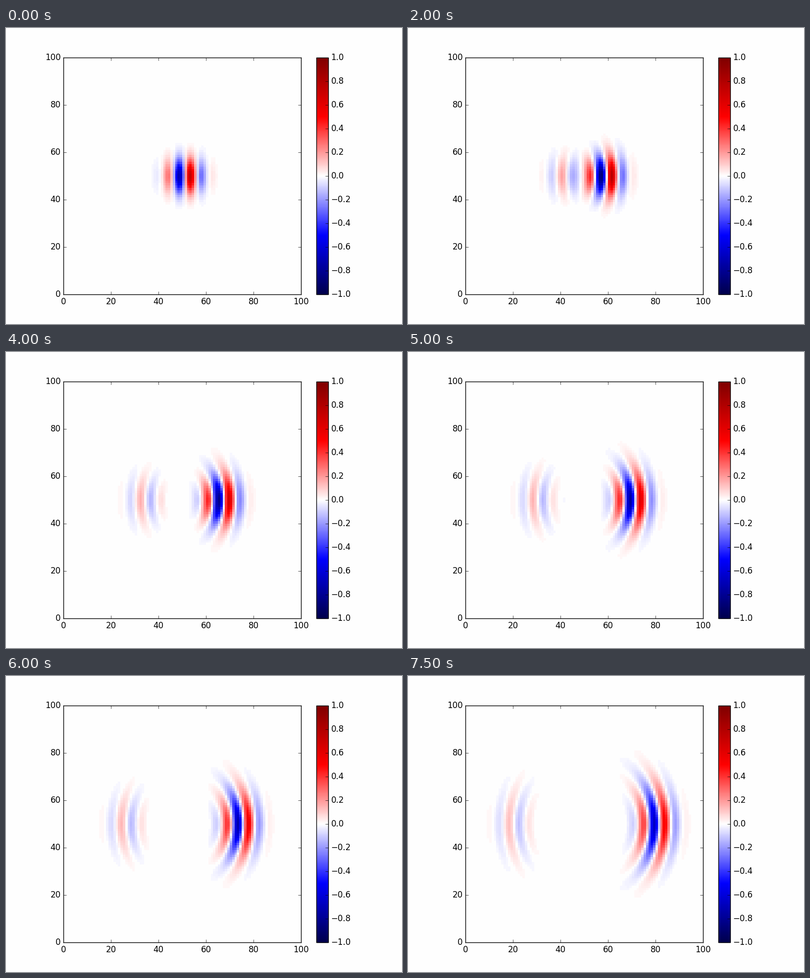
Animation, 800 px wide and 600 px high, one loop 8000 ms. Source, as a matplotlib script:

```python
import numpy as np
import matplotlib.pyplot as plt
from matplotlib.animation import FuncAnimation

FRAMES, INTERVAL = 16, 500
SIZE = 100          # visible cells per side
PAD = 78            # hidden margin, so nothing wraps around
SPEED = 1.99        # cells per frame
FLOOR = 0.012       # weaker values are left blank
PAPER = "#fefefe"

plt.rcParams.update({
    "font.family": "DejaVu Sans",
    "font.size": 12,
    "text.hinting": "auto",
    "axes.linewidth": 1.0,
    "axes.axisbelow": False,
    "ytick.alignment": "center",
})
for axis in "xtick", "ytick":
    plt.rcParams.update({
        f"{axis}.direction": "in",
        f"{axis}.labelsize": 12,
        f"{axis}.major.size": 4,
        f"{axis}.major.width": 0.5,
        f"{axis}.major.pad": 4,
    })

cells = np.arange(-PAD, SIZE + PAD) + 0.5
X, Y = np.meshgrid(cells, cells)
wave_numbers = 2 * np.pi * np.fft.fftfreq(cells.size)
omega = SPEED * np.hypot(*np.meshgrid(wave_numbers, wave_numbers))


def packet(amp, k, node, center):
    """Gaussian wave packet; the sign of k sets its direction."""
    envelope = np.exp(-((X - center) ** 2 + (Y - 50) ** 2) / 50)
    return amp * envelope * np.exp(1j * k * (X - node))


right = packet(1.0, 2 * np.pi / 10, 51.1, 50.9)
left = packet(0.195, -0.67, 51.15, 49.7)
spectrum = np.fft.fft2(right + left)


def field(t):
    wave = np.fft.ifft2(spectrum * np.exp(-1j * omega * t)).imag
    visible = wave[PAD:PAD + SIZE, PAD:PAD + SIZE]
    return np.ma.masked_where(np.abs(visible) < FLOOR, visible)


fig = plt.figure(figsize=(8, 6), dpi=100, facecolor=PAPER)
ax = fig.add_axes([116 / 800, 0.1, 0.6, 0.8], facecolor=PAPER)
cax = fig.add_axes([627 / 800, 0.1, 24 / 800, 0.8])

edges = np.arange(SIZE + 1)
mesh = ax.pcolormesh(edges, edges, field(0), vmin=-1, vmax=1,
                     cmap=plt.get_cmap("seismic", 257))
ax.set(xlim=(0, SIZE), ylim=(0, SIZE),
       xticks=range(0, 101, 20), yticks=range(0, 101, 20))
ax.tick_params(top=True, right=True)
fig.colorbar(mesh, cax=cax, ticks=np.linspace(-1, 1, 11))


def update(i):
    mesh.set_array(field(i))
    return [mesh]


anim = FuncAnimation(fig, update, frames=FRAMES, interval=INTERVAL,
                     repeat=True, repeat_delay=0)
plt.show()
```
